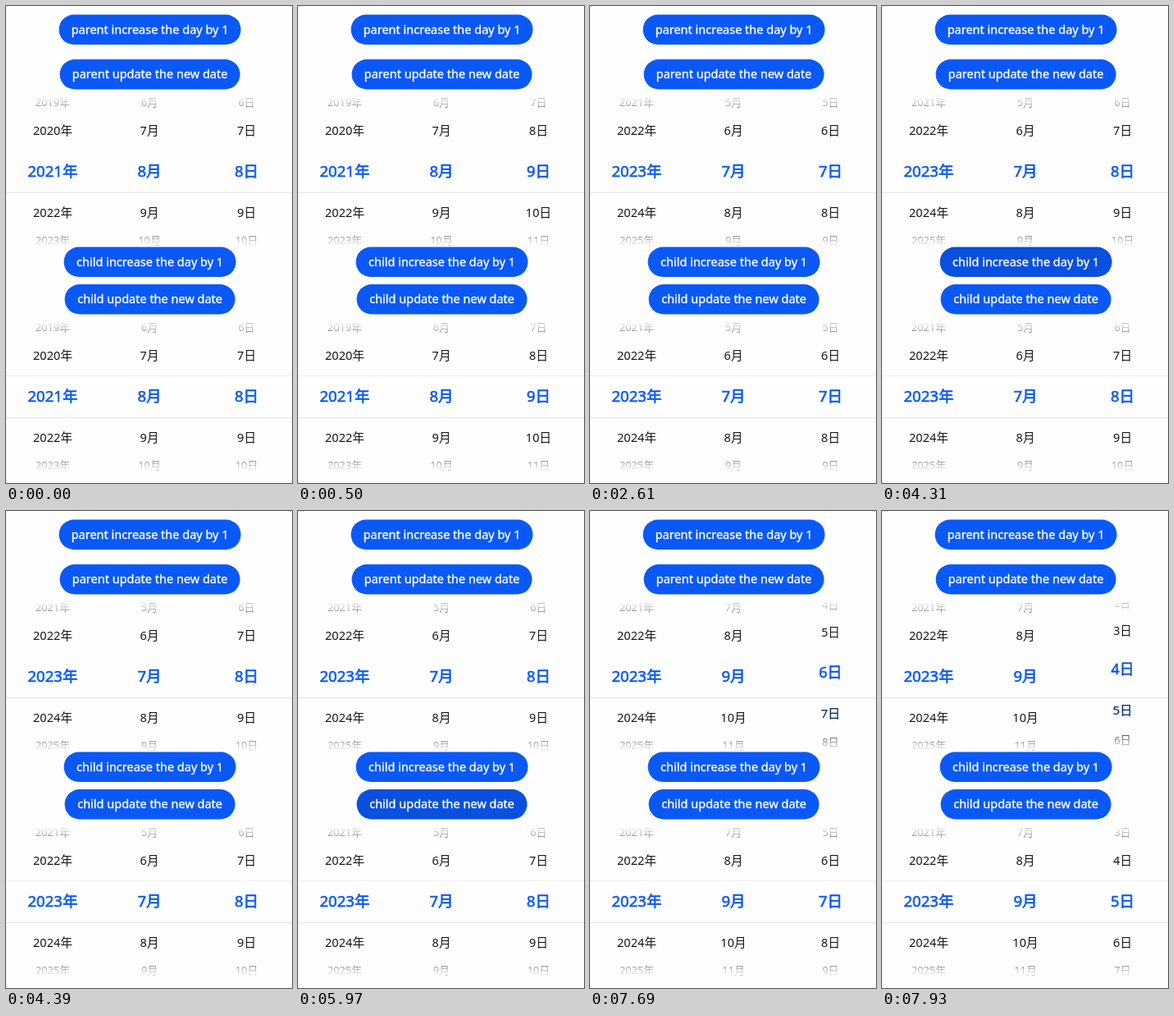
Recreate the animation shown at these times as an HTML page with a canvas. Size 349 px wide and 581 px high, loop 8000 ms.

```html
<!DOCTYPE html>
<html lang="en">
<head>
<meta charset="utf-8">
<title>Date pickers</title>
<style>
  html, body { margin: 0; width: 100%; height: 100%; overflow: hidden; background: #fefefe; }
  canvas { display: block; }
</style>
</head>
<body>
<canvas id="stage" width="349" height="581"></canvas>
<script>
const ctx = document.getElementById('stage').getContext('2d');
const LOOP = 8000;
const FONT = '"Noto Sans", "Noto Sans CJK SC", "Noto Sans CJK JP", sans-serif';
const PAPER = '254, 254, 254';
const BLUE = [10, 89, 247];
const INK = [22, 22, 24];

const BUTTONS = [
  { label: 'parent increase the day by 1', y: 10.5, w: 222 },
  { label: 'parent update the new date', y: 65, w: 220, press: [2490, 2610] },
  { label: 'child increase the day by 1', y: 293.5, w: 210, press: [4310, 4390] },
  { label: 'child update the new date', y: 339, w: 208, press: [5970, 6090] }
];
const BUTTON_X = 175.6;

const DATES = [
  { at: 0, year: 2021, month: 8, day: 8 },
  { at: 500, year: 2021, month: 8, day: 9 },
  { at: 2570, year: 2023, month: 7, day: 7 },
  { at: 4310, year: 2023, month: 7, day: 8 },
  { at: 6010, year: 2023, month: 9, day: 9 }
];

const TOUCH = 7290;
const DRAG = 7330;
const STEP = 40;
const DRAG_SPEED = 0.00805; // days per ms

// Row offset from the centre and font size, by distance from the selection.
const ROW_Y = [0, 50, 83.7, 112];
const ROW_SIZE = [18.6, 14.6, 12.8, 12];

const during = (t, span) => span && t >= span[0] && t < span[1];
const lerp = (a, b, k) => a + (b - a) * k;

function along(points, d) {
  const i = Math.min(Math.floor(d), points.length - 2);
  return lerp(points[i], points[i + 1], d - i);
}

function pill(x, y, w, h, r, color) {
  ctx.fillStyle = color;
  ctx.beginPath();
  ctx.roundRect(x, y, w, h, r);
  ctx.fill();
}

// A thin outline of width `boost` gives the regular face a medium weight.
function text(str, x, y, size, boost, color) {
  ctx.font = `${size}px ${FONT}`;
  ctx.fillStyle = ctx.strokeStyle = color;
  ctx.textAlign = 'center';
  ctx.lineJoin = 'round';
  const base = y + size * 0.345;
  ctx.fillText(str, x, base);
  if (boost > 0) {
    ctx.lineWidth = boost;
    ctx.strokeText(str, x, base);
  }
}

function drawButton(b, t) {
  const color = during(t, b.press) ? '#0950de' : '#0a59f7';
  pill(BUTTON_X - b.w / 2, b.y, b.w, 36.5, 18.25, color);
  text(b.label, BUTTON_X, b.y + 18.2, 14.5, 0.35, '#fff');
}

function drawColumn(x, cy, value, unit) {
  const first = Math.ceil(value - 2.9);
  for (let n = first; n < value + 2.9; n++) {
    const d = n - value;
    const dist = Math.abs(d);
    const near = Math.sqrt(Math.max(0, 1 - dist));
    const rgb = INK.map((c, i) => Math.round(lerp(c, BLUE[i], near)));
    const y = cy + Math.sign(d) * along(ROW_Y, dist);
    text(n + unit, x, y, along(ROW_SIZE, dist), 0.6 * near, `rgb(${rgb})`);
  }
}

function fade(from, to) {
  const g = ctx.createLinearGradient(0, from, 0, to);
  g.addColorStop(0, `rgba(${PAPER}, 1)`);
  g.addColorStop(1, `rgba(${PAPER}, 0)`);
  ctx.fillStyle = g;
  ctx.fillRect(0, Math.min(from, to), 349, Math.abs(to - from));
}

function drawPicker(cy, year, month, day) {
  ctx.save();
  ctx.beginPath();
  ctx.rect(0, cy - 89, 349, 179);
  ctx.clip();
  drawColumn(57, cy, year, '年');
  drawColumn(175, cy, month, '月');
  drawColumn(293.5, cy, day, '日');
  fade(cy - 91, cy - 64);
  fade(cy + 91, cy + 64);
  ctx.restore();
}

function line(y, color) {
  ctx.fillStyle = color;
  ctx.fillRect(0, y, 349, 1);
}

function draw(t) {
  const { year, month, day } = DATES.filter(d => d.at <= t).pop();
  const tick = TOUCH + Math.floor((t - TOUCH) / STEP) * STEP;
  const dragged = day - Math.max(0, tick - DRAG) * DRAG_SPEED;

  ctx.fillStyle = `rgb(${PAPER})`;
  ctx.fillRect(0, 0, 349, 581);
  if (during(t, [TOUCH, DRAG + STEP])) pill(237, 178, 113, 48, 8, '#f2f2f2');
  line(227, '#e6e6e6');
  line(450, '#f0f0f0');
  line(501, '#e6e6e6');
  drawPicker(201.5, year, month, dragged);
  drawPicker(475.5, year, month, Math.ceil(dragged));
  BUTTONS.forEach(b => drawButton(b, t));
}

function frame() {
  draw(performance.now() % LOOP);
  requestAnimationFrame(frame);
}
frame();
</script>
</body>
</html>
```
